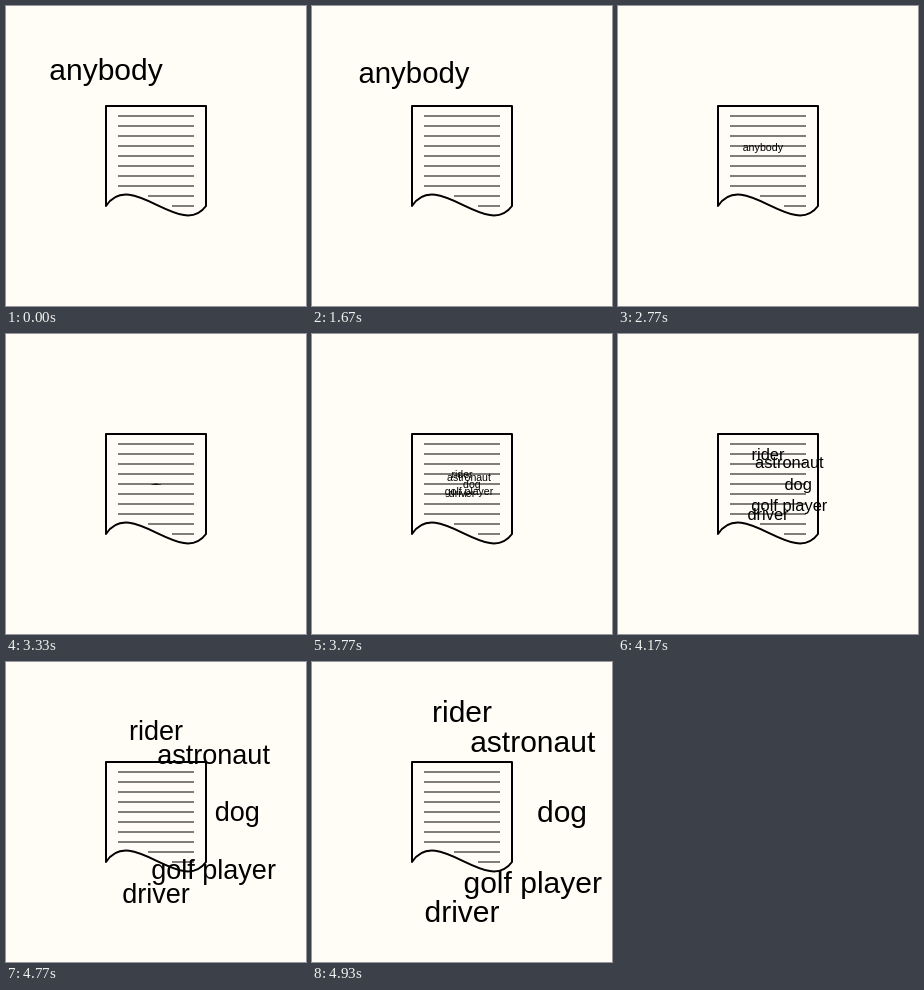
These frames come from a looping animation (300x300 px, 6.66 s). An HTML page with a canvas:

```html
<!DOCTYPE html>
<html lang="en">
<head>
<meta charset="utf-8">
<style>
  html, body { margin: 0; width: 100%; height: 100%; overflow: hidden; background: #fffdf5; }
  canvas { display: block; }
</style>
</head>
<body>
<canvas id="stage" width="300" height="300"></canvas>
<script>
const ctx = document.getElementById("stage").getContext("2d");
const LOOP = 6660, STEP = LOOP / 200;
const input = [["anybody", -120]];
const output = [["rider", -90], ["astronaut", -45], ["dog", 0], ["golf player", 45], ["driver", 90]];

function line(x1, x2, y) {
  ctx.beginPath();
  ctx.moveTo(x1, y);
  ctx.lineTo(x2, y);
  ctx.stroke();
}

function drawPaper() {
  ctx.strokeStyle = "#000";
  ctx.lineJoin = "round";
  ctx.lineWidth = 2;
  ctx.beginPath();
  ctx.moveTo(100, 200);
  ctx.bezierCurveTo(125, 162, 175, 234, 200, 200);
  ctx.lineTo(200, 100);
  ctx.lineTo(100, 100);
  ctx.closePath();
  ctx.fillStyle = "#fffcf7";
  ctx.fill();
  ctx.stroke();

  ctx.lineWidth = 1;
  for (let y = 110; y <= 180; y += 10) line(112, 188, y);
  line(142, 188, 190);
  line(166, 188, 200);
}

// u runs from 0 at the paper's centre to 1 at full size and distance
function drawWords(words, u) {
  if (u < 0.03) return;
  const radius = 100 * u * u;
  const size = 30 * u + 15 * u * Math.max(0, 0.55 - u);
  ctx.fillStyle = "#000";
  ctx.textAlign = "center";
  ctx.font = `${size}px "Liberation Sans", Arial, sans-serif`;
  for (const [word, degrees] of words) {
    const a = degrees * Math.PI / 180;
    ctx.fillText(word, 150 + radius * Math.cos(a), 150 + radius * Math.sin(a) + 0.346 * size);
  }
}

function draw(ms) {
  const step = Math.floor(((ms + 4) % LOOP) / STEP);
  ctx.fillStyle = "#fffdf5";
  ctx.fillRect(0, 0, 300, 300);
  drawPaper();
  if (step < 99) drawWords(input, Math.min(1, (99 - step) / 50));
  else drawWords(output, Math.min(1, (step - 97) / 51));
}

const start = performance.now();
function tick() {
  draw(performance.now() - start);
  requestAnimationFrame(tick);
}
tick();
</script>
</body>
</html>
```
